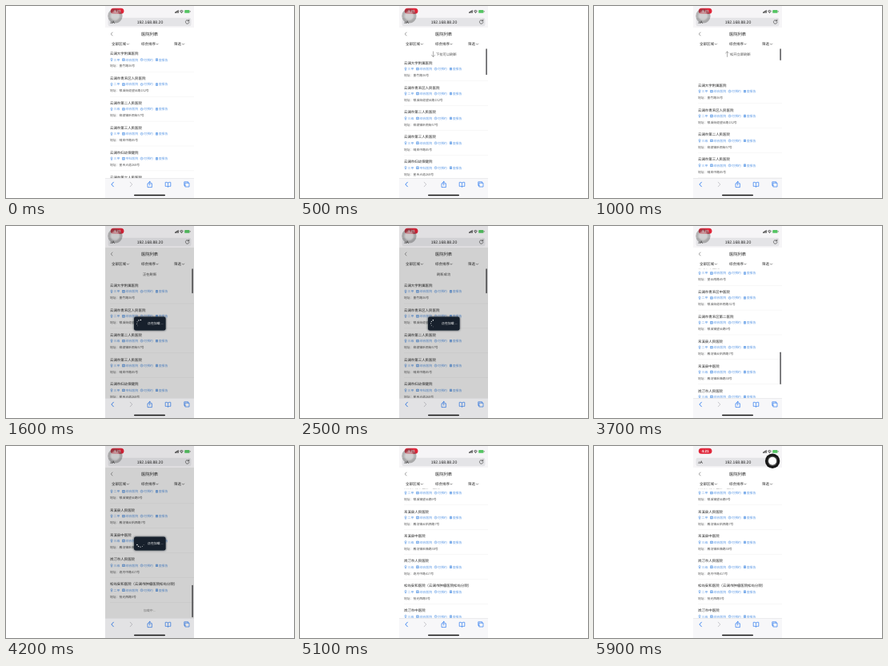
Write an HTML page that moves like this. It is 360 px wide and 240 px high and loops after 6 s.

```html
<!DOCTYPE html>
<html lang="zh">
<head>
<meta charset="utf-8">
<title>医院列表</title>
<style>
html, body { margin: 0; width: 100%; height: 100%; overflow: hidden; background: #fff; }
svg { display: block; width: 100vw; height: 100vh; }
text { font-family: "Noto Sans CJK SC", "Noto Sans CJK", "Noto Sans", sans-serif; text-rendering: geometricPrecision; white-space: pre; }
.latin { font-family: "Liberation Sans", Arial, sans-serif; }
.line { fill: none; stroke-linecap: round; stroke-linejoin: round; }
</style>
</head>
<body>
<svg viewBox="0 0 360 240" xmlns="http://www.w3.org/2000/svg">
  <defs>
    <clipPath id="phone"><rect x="124" width="111" height="240"/></clipPath>
    <clipPath id="view"><rect x="124" y="53" width="111" height="162"/></clipPath>
    <filter id="soft" x="-20%" y="-30%" width="140%" height="160%"><feGaussianBlur stdDeviation="1"/></filter>
  </defs>
  <g clip-path="url(#phone)">
    <rect x="124" width="111" height="240" fill="#fff"/>
    <g clip-path="url(#view)">
      <g id="pull"></g>
      <g id="list"></g>
    </g>
    <g id="head"></g>
    <rect id="bar" x="232.3" width="1.6" rx=".8" fill="#5d5d60"/>
    <g id="loading">
      <rect x="124" y="27" width="111" height="188" fill="#000" opacity=".18"/>
      <rect x="159.5" y="113" width="40.5" height="18" rx="3" fill="#17202c" opacity=".6" filter="url(#soft)"/>
      <rect x="160" y="113.4" width="39.6" height="17.2" rx="2.4" fill="#17202c"/>
      <g id="dots" fill="#fff"></g>
    </g>
    <g id="chrome"></g>
    <g id="shade" fill="#000" opacity=".08">
      <rect x="124" width="111" height="27"/>
      <rect x="124" y="215" width="111" height="25"/>
    </g>
    <g id="touch">
      <circle id="disc" r="9.2"/>
      <circle id="ring" r="6.3" fill="#fff"/>
      <circle id="core" r="5" fill="#fff"/>
    </g>
  </g>
</svg>
<script>
const LOOP = 6000, STEP = 100, PITCH = 30.9, BLUE = '#2f7cf0', TAG = '#5f9be6';
const $ = id => document.getElementById(id);

const label = (s, x, y, size, fill = '#222', extra = '') =>
  `<text x="${x}" y="${y + size * 0.37}" font-size="${size}" fill="${fill}" ${extra}>${s}</text>`;
const line = (d, stroke, w = 0.8) =>
  `<path class="line" d="${d}" stroke="${stroke}" stroke-width="${w}"/>`;
const box = (x, y, w, h, fill, r = 0) =>
  `<rect x="${x}" y="${y}" width="${w}" height="${h}" rx="${r}" fill="${fill}"/>`;

// name | grade | kind | address
const places = `云澜大学附属医院|三甲|综合医院|墨竹路36号
云澜市青禾区人民医院|二甲|综合医院|银溪街道望云路152号
云澜市第二人民医院|三级|综合医院|柳渡镇听雨街57号
云澜市第三人民医院|三甲|综合医院|晴岚中路85号
云澜市妇幼保健院|三甲|专科医院|星禾大道268号
云澜市第六人民医院|二甲|综合医院|逐月南路74号
云澜市中医院|三甲|综合医院|拾光东路41号
云澜市第四人民医院|三级|专科医院|晴岚东路37号
云澜市口腔医院|二甲|专科医院|墨竹路92号
云澜市康复医院|二级|专科医院|柳渡镇采薇路18号
枫泊市人民医院|三级|综合医院|星禾大道73号
枫泊市中医院|三甲|综合医院|听雨西路29号
松屿市人民医院|三级|综合医院|拾光中路88号
松屿市中医院|三甲|综合医院|望云南路45号
云澜市青禾区中医院|二甲|综合医院|银溪街道听雨路31号
云澜市青禾区第二医院|二甲|综合医院|银溪镇望云路9号
禾溪县人民医院|二甲|综合医院|雁泊镇云帆西路7号
禾溪县中医院|三级|综合医院|雁泊镇采薇路38号
岚汀市人民医院|三级|综合医院|逐月中路417号
松屿安和医院（云澜市肿瘤医院松屿分院）|二甲|综合医院|拾光西路5号
岚汀市中医院|三级|综合医院|逐月中路126号`.split('\n').map(s => s.split('|'));

function tags(y, grade, kind) {
  return `<circle cx="132" cy="${y - 0.7}" r="1.1" fill="none" stroke="${TAG}" stroke-width=".6"/>` +
    line(`M131.4 ${y + 0.6}v1.2l.6-.4 .6.4v-1.2`, TAG, 0.5) +
    label(grade, 134.6, y, 3.9, TAG) +
    box(145.2, y - 1.7, 3.4, 3.4, TAG, 0.5) +
    line(`M146.9 ${y - 0.9}v1.8m-.9-.9h1.8`, '#fff', 0.5) +
    label(kind, 149.4, y, 3.95, TAG) +
    `<circle cx="169.6" cy="${y}" r="1.5" fill="none" stroke="${TAG}" stroke-width=".6"/>` +
    line(`M169.6 ${y - 0.7}v.8h.6`, TAG, 0.4) +
    label('可预约', 172, y, 3.95, TAG) +
    box(187, y - 1.7, 3, 3.4, TAG, 0.4) +
    line(`M187.8 ${y - 0.5}h1.4m-1.4 1.1h1.4`, '#fff', 0.4) +
    label('查报告', 190.7, y, 3.95, TAG);
}

function place([name, grade, kind, address], i) {
  const y = 59.5 + i * PITCH;
  return `<g ${i > 19 ? 'class="more"' : ''}>` +
    label(name, 130, y, 4.45) + tags(y + 7.6, grade, kind) +
    label('地址：' + address, 130, y + 15.5, 3.85, '#555') +
    box(130, y + 22.6, 105, 0.4, '#ececec') + '</g>';
}

$('list').innerHTML = box(124, 53, 111, 800, '#fff') + places.map(place).join('') +
  `<g id="tail">${label('加载中...', 179.5, 59.5 + 20 * PITCH + 1.6, 3.9, '#888', 'text-anchor="middle"')}</g>`;

const down = (x, y) => line(`M${x - 1.2} ${y - 0.5}l1.2 1.2 1.2-1.2`, '#444', 0.6);
$('head').innerHTML = box(124, 27, 111, 26, '#fff') +
  line('M133 33l-1.8 2 1.8 2', '#666', 0.6) +
  label('医院列表', 179.5, 34.9, 5.3, '#222', 'text-anchor="middle"') +
  label('全部区域', 132, 47.3, 4.5) + down(152.4, 47.6) +
  label('综合排序', 169, 47.3, 4.5) + down(189, 47.6) +
  label('筛选', 210, 47.3, 4.5) + down(221.5, 47.6);

$('chrome').innerHTML = box(124, 0, 111, 27, '#f6f5f7') + box(127.5, 14.7, 104, 10.6, '#e4e4e7', 2.4) +
  box(130.8, 2.7, 16.6, 7, '#e0263a', 3.5) +
  label('4:21', 139.1, 6.1, 4.6, '#fff', 'class="latin" font-weight="bold" text-anchor="middle"') +
  [0, 1, 2, 3].map(i => box(211 + i * 1.25, 7.6 - i * 0.8, 0.9, 1.2 + i * 0.8, '#222', 0.2)).join('') +
  line('M217.4 6.2q2-1.8 4 0m-3.2 1.2q1.2-1 2.4 0', '#222', 0.7) + '<circle cx="219.4" cy="8.4" r=".5" fill="#222"/>' +
  box(223.2, 5, 6.3, 3.8, '#55c463', 0.9) + box(229.9, 6.1, 0.6, 1.6, '#888', 0.2) +
  label('A', 130.2, 20.4, 3.8, '#222', 'class="latin"') + label('A', 132.6, 20, 5, '#222', 'class="latin"') +
  label('192.168.88.20', 180, 19.9, 5.1, '#222', 'class="latin" text-anchor="middle"') +
  line('M228.6 18.6a2.3 2.3 0 1 0 .4 1.6M228.8 17v1.8h-1.8', '#333', 0.6) +
  box(124, 215, 111, 25, '#f7f7f9') + box(124, 215, 111, 0.4, '#d6d6da') +
  line('M134.4 220.2l-2.6 2.8 2.6 2.8', BLUE, 0.9) +
  line('M155.2 220.2l2.6 2.8-2.6 2.8', '#c5c5ca', 0.9) +
  line('M178.6 221.8h-1.6v4.8h5.4v-4.8h-1.6M179.7 224v-4.6m-1.4 1.3l1.4-1.4 1.4 1.4', BLUE, 0.7) +
  line('M202.5 221q-1.6-1.2-3.3-.6v5q1.7-.5 3.3.6q1.6-1.1 3.3-.6v-5q-1.7-.6-3.3.6v5', BLUE, 0.7) +
  line('M224 224.4h-1.2v-4.6h4.8v1.2M224.2 221.2h4.8v4.8h-4.8z', BLUE, 0.7) +
  box(160, 235.8, 39, 1.5, '#111', 0.75);

const DOTS = 5;
$('dots').innerHTML = '<circle/>'.repeat(DOTS);
$('loading').insertAdjacentHTML('beforeend', label('正在加载 ...', 177, 121.8, 3.9, '#fff', 'font-weight="500"'));

const clamp = v => Math.min(1, Math.max(0, v));
const easeOut = p => 1 - (1 - p) ** 3;
const smooth = p => p * p * (3 - 2 * p);
const span = (t, a, b, ease = smooth) => ease(clamp((t - a) / (b - a)));
const show = (el, on) => el.setAttribute('visibility', on ? 'visible' : 'hidden');
const move = (el, x, y) => el.setAttribute('transform', `translate(${x} ${y})`);

function pullHint(t, pulled) {
  const hint = (s, x) => label(s, x, 60, 4.3, '#444');
  if (t < 1150) {
    const ready = pulled > 24;
    const arrow = ready ? 'M166.5 63.4v-6.4m-2 2l2-2 2 2' : 'M166.5 57v6.4m-2-2l2 2 2-2';
    return line(arrow, '#777', 0.6) + hint(ready ? '松开立即刷新' : '下拉可以刷新', 170);
  }
  return hint(t < 2300 ? '正在刷新' : '刷新成功', 171);
}

function draw(t) {
  const pulled = 39.5 * span(t, 250, 950) - 24.8 * span(t, 1100, 1400, easeOut) - 14.7 * span(t, 2850, 3100);
  const loaded = t >= 5050;
  const end = 473.9;
  const scroll = loaded ? 472 : end * span(t, 3200, 3850);
  const busy = (t >= 1300 && t < 2950) || (t >= 3900 && !loaded);

  move($('list'), 0, pulled - scroll);
  $('pull').innerHTML = pullHint(t, pulled);
  show($('tail'), !loaded);
  document.querySelectorAll('.more').forEach(el => show(el, loaded));

  const bar = $('bar');
  bar.setAttribute('y', 53.3 + 120.5 * Math.min(1, scroll / end));
  bar.setAttribute('height', 40.5 - 0.65 * pulled);
  bar.setAttribute('opacity', span(t, 250, 450) - span(t, 4600, 4900));

  show($('loading'), busy);
  show($('shade'), busy);
  const turn = 180 + (t - 2500) * 630 / 1700;
  [...$('dots').children].forEach((dot, i) => {
    const a = (turn + (i - 2) * 34) * Math.PI / 180;
    dot.setAttribute('cx', 168 + 4.4 * Math.cos(a));
    dot.setAttribute('cy', 121.8 + 4.4 * Math.sin(a));
    dot.setAttribute('r', 0.45 + i * 0.08);
    dot.setAttribute('opacity', 0.55 + i * 0.11);
  });

  const drag = span(t, 5250, 5700), press = span(t, 5150, 5350);
  move($('touch'), 136.4 + 86.7 * drag, 12.4 + 6.3 * drag);
  $('disc').setAttribute('fill', press > 0.5 ? '#111' : '#505050');
  $('disc').setAttribute('opacity', 0.4 + 0.58 * press);
  $('ring').setAttribute('opacity', 0.22);
  $('core').setAttribute('opacity', 0.25 + 0.75 * press);
}

function tick() {
  const t = performance.now() % LOOP;
  draw(Math.floor(t / STEP) * STEP);
  requestAnimationFrame(tick);
}
tick();
</script>
</body>
</html>
```
